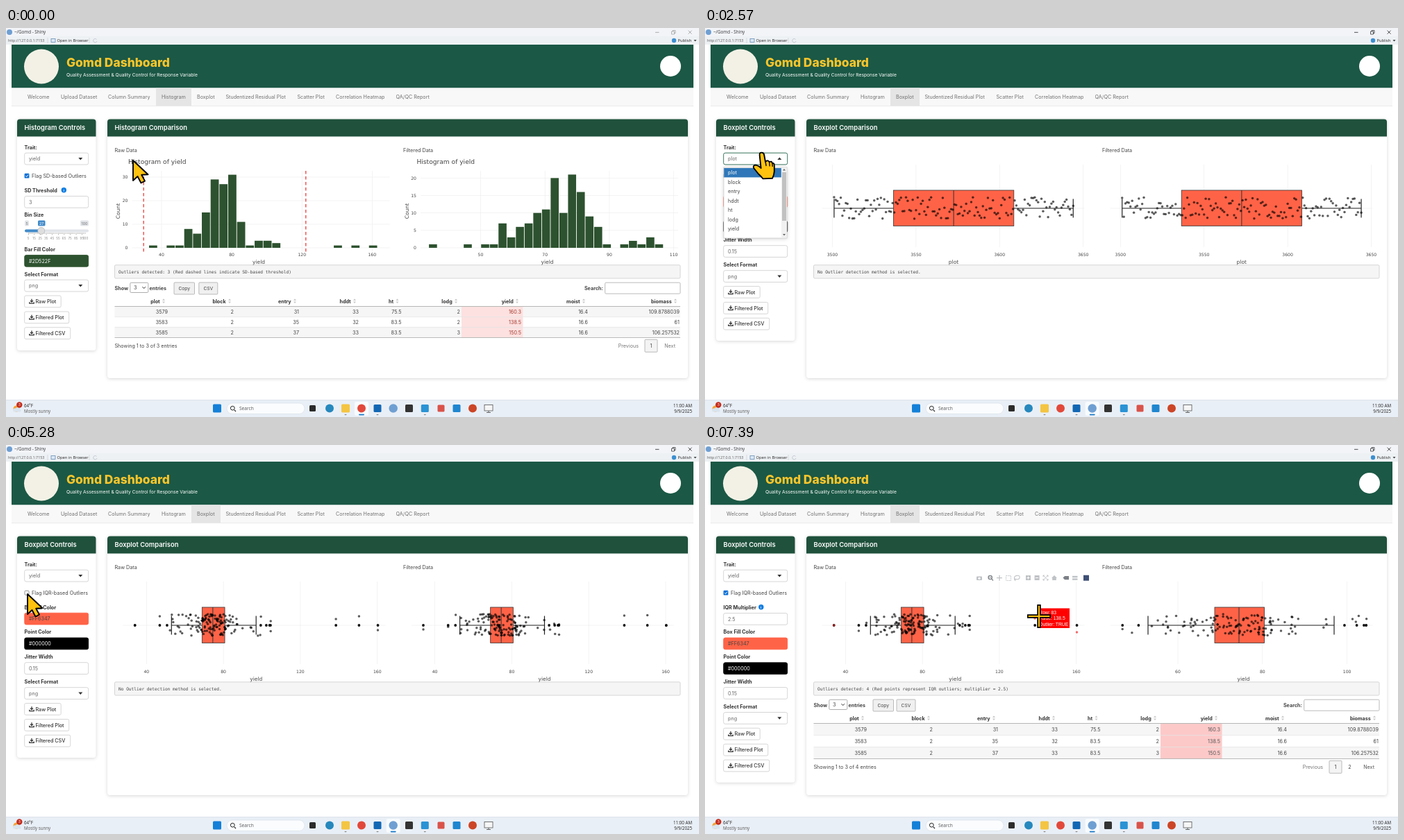
Write an HTML page that moves like this. It is 998 by 561 pixels and loops after 8 s.

```html
<!DOCTYPE html>
<html lang="en">
<head>
<meta charset="utf-8">
<title>Dashboard walkthrough</title>
<style>
html, body { margin: 0; width: 100%; height: 100%; overflow: hidden; background: #fff; }
svg { display: block; width: 998px; height: 561px; font-family: Inter, sans-serif; }
.plot { font-family: "DejaVu Sans", sans-serif; }
.mono { font-family: "DejaVu Sans Mono", monospace; }
.os { font-family: "Open Sans", sans-serif; }
.tip { font-family: "Liberation Sans", sans-serif; }
.panel { filter: drop-shadow(0 1px 2.5px rgba(0, 0, 0, .16)); }
</style>
</head>
<body>
<svg id="stage" viewBox="0 0 998 561" xmlns="http://www.w3.org/2000/svg"></svg>
<script>
const LOOP = 8000;
const END = 'text-anchor="end"', MID = 'text-anchor="middle"', BOLD = 'font-weight="700"';
const GREEN = '#1f513c', BAR = '#2D522F', TOMATO = '#FF6347';

// Markup helpers; text is placed by its vertical middle
const rect = (x, y, w, h, fill, o = '') => `<rect x="${x}" y="${y}" width="${w}" height="${h}" fill="${fill}" ${o}/>`;
const circ = (x, y, r, fill, o = '') => `<circle cx="${x}" cy="${y}" r="${r}" fill="${fill}" ${o}/>`;
const path = (d, stroke, w = 1, o = '') => `<path d="${d}" fill="none" stroke="${stroke}" stroke-width="${w}" ${o}/>`;
const fill = (d, color, o = '') => `<path d="${d}" fill="${color}" ${o}/>`;
const text = (x, y, s, o = '', size = 7.2, color = '#444') =>
  `<text x="${x}" y="${y + size * .36}" font-size="${size}" fill="${color}" ${o}>${s}</text>`;
const frame = (x, y, w, h, o = '', bg = '#fff', line = '#ccc') =>
  rect(x, y, w, h, bg, `stroke="${line}" stroke-width=".8" ${o}`);
const rng = s => () => (s = s * 16807 % 2147483647) / 2147483647;
const each = (list, fn) => list.map(fn).join('');

// Window chrome, banner and taskbar
function base() {
  const tabs = [[31, 'Welcome'], [79, 'Upload Dataset'], [147, 'Column Summary'], [224, 'Histogram'], [275, 'Boxplot'],
    [316.5, 'Studentized Residual Plot'], [419.5, 'Scatter Plot'], [475, 'Correlation Heatmap'], [561.5, 'QA/QC Report']];
  const os = 'class="os"';
  return rect(0, 0, 998, 561, '#fff') + rect(0, 0, 998, 12, '#f2f4f8') + rect(0, 12, 998, 12, '#eef1f4')
    + circ(5, 6, 4, '#6f9fd2') + text(12, 6, '~/Gomd - Shiny', os, 6.3, '#333')
    + text(3, 18, 'http://127.0.0.1:7153', os, 5.4, '#555') + path('M60 14V22M120 14V22', '#ccd2d8', .7)
    + frame(65, 15.5, 6, 5, '', '#dbe8f6', '#6c8fb5') + text(73.5, 18, 'Open in Browser', os, 5.8, '#222')
    + path('M130.5 16.5A2.7 2.7 0 1 0 131 19', '#b9c3cd', .9)
    + circ(962, 18, 3.2, '#3d8fd0') + text(967.5, 18, 'Publish', os, 5.8, '#222') + fill('M990.5 17h4l-2 2.4z', '#444')
    + rect(8, 24, 982, 62.5, '#1b5845') + circ(51, 55.5, 25, '#f3f1e6') + circ(957, 55, 15, '#fff')
    + text(87, 49.5, 'Gomd Dashboard', 'font-weight="800"', 17.4, '#f9c52c')
    + text(87, 68, 'Quality Assessment &amp; Quality Control for Response Variable', '', 6.7, '#fff')
    + rect(8, 86.5, 982, 26, '#f8f8f8') + rect(8, 112, 982, .7, '#e4e4e4')
    + '<g id="tab">' + rect(0, 86.5, 1, 25.5, '#e5e5e5') + '</g>'
    + each(tabs, ([x, s]) => text(x, 99.3, s, '', 7.2, '#707070'))
    + panel(146, 836, 505) + text(156.5, 176, 'Raw Data') + text(572, 176, 'Filtered Data')
    + frame(156.5, 341.8, 814.5, 19.2, 'rx="1.5"', '#f5f5f5') + taskbar();
}

function taskbar() {
  const sq = (x, c, w = 11) => rect(x - w / 2, 548.5 - w / 2, w, w, c, 'rx="1.5"');
  const os = 'class="os"';
  return rect(0, 536, 998, 25, '#e9eff6') + rect(0, 536, 998, .6, '#d5dce4')
    + circ(15, 549, 4.5, '#f2a33a') + fill('M11 553.5a3 3 0 0 1 3-5 4 4 0 0 1 7 2 2 2 0 0 1 0 3z', '#d9e4ee')
    + circ(19.3, 543.5, 4.2, '#c42b1c') + text(19.3, 543.5, '3', MID + os, 5.5, '#fff')
    + text(26, 544.5, '64°F', os, 6.2, '#222') + text(26, 552.5, 'Mostly sunny', os, 6.2, '#555')
    + sq(304, '#1480d8', 12) + rect(318, 541, 112, 15.5, '#fafcfe', 'rx="7.7" stroke="#d6dde5" stroke-width=".6"')
    + path('M328.8 550.8L331 553', '#222', 1.1) + circ(326.3, 548.2, 2.9, 'none', 'stroke="#222" stroke-width="1"')
    + text(336, 548.8, 'Search', os, 6.6, '#555')
    + '<g id="active">' + rect(-10, 539, 20, 20, '#f8fbfd', 'rx="2.5"') + rect(-4, 556.8, 8, 1.6, '#1677c8', 'rx=".8"') + '</g>'
    + sq(441.5, '#2b2b2b', 9) + circ(466, 548.5, 6, '#2688bd') + sq(489, '#f4c542', 12) + circ(512, 548.5, 6, '#e2483a')
    + sq(535, '#1267b4') + circ(557.7, 548.5, 6.2, '#6f9fd2') + sq(580.5, '#333') + sq(603.3, '#2a93d4')
    + sq(626.5, '#d9534a', 10) + sq(649, '#1f86cf', 11) + circ(672, 548.5, 6, '#cc4526')
    + frame(689, 543.5, 12, 8.5, '', '#f5f5f5', '#555') + path('M695 552V554.5M692 554.5H698', '#555', .9)
    + each([489, 535, 603.3], x => rect(x - 1.5, 557, 3, 1.2, '#888', 'rx=".6"'))
    + text(988, 544.8, '11:00 AM', END + os, 6.2, '#222') + text(988, 552.8, '9/9/2025', END + os, 6.2, '#222');
}
const windowButtons = color => path('M935 6.3H940.5M982.6 3.6L987.6 8.6M987.6 3.6L982.6 8.6', color, .8)
  + path('M958.5 5H962.5V9H958.5ZM960 5V3.5H964V7.5H962.5', color, .7);

function panel(x, w, bottom) {
  return rect(x, 131.5, w, bottom - 131.5, '#fff', 'rx="4" class="panel"')
    + fill(`M${x} 156.5V135.5q0-4 4-4H${x + w - 4}q4 0 4 4V156.5Z`, GREEN);
}
const heading = (x, s) => text(x, 144, s, 'font-weight="600"', 9.4, '#fff');

// Form controls
const label = (y, s) => text(26.5, y, s, BOLD, 7.2, '#333');
const info = (x, y) => circ(x, y, 3.7, '#0d7be0') + text(x, y, 'i', MID + BOLD, 5, '#fff');
const input = (y, s, bg = '#fff', color = '#666') =>
  frame(26.7, y - 8.3, 92, 16.8, 'rx="2.5"', bg, bg === '#fff' ? '#ccc' : bg) + text(33, y + .3, s, '', 7.2, color);
const select = (y, s) => input(y, s) + fill(`M104.3 ${y - 1.5}h6l-3 3.4z`, '#333');
const download = (x, y) => path(`M${x} ${y - 3.6}V${y + .4}M${x - 2} ${y - 1.2}L${x} ${y + .8}L${x + 2} ${y - 1.2}`, '#333', 1.3)
  + path(`M${x - 3.2} ${y + 1}V${y + 2.8}H${x + 3.2}V${y + 1}`, '#333', 1.3);
const button = (y, s, w) => frame(26.7, y - 8.3, w, 16.8, 'rx="2"') + download(37, y) + text(42.5, y + .2, s, 'font-weight="500"', 7.2, '#333');
const buttons = y => button(y, 'Raw Plot', 52.5) + button(y + 23, 'Filtered Plot', 64) + button(y + 45.8, 'Filtered CSV', 66);
const tick = on => on ? rect(26.6, 209.8, 6.8, 6.8, '#0b6fd6', 'rx="1.2"') + path('M28.2 213.2L29.6 214.7L32 211.6', '#fff', 1)
  : frame(27, 210.2, 6, 6, 'rx="1.2"', '#fff', '#777');

function slider() {
  const tag = (x, w, s, bg, c) => rect(x, 277.5, w, 8, bg, 'rx="1.5"') + text(x + w / 2, 281.7, s, MID, 5.4, c);
  let s = tag(27, 6, '5', '#e1e4e9', '#777') + tag(107, 12, '100', '#e1e4e9', '#777') + tag(46, 10.5, '27', '#428bca', '#fff')
    + rect(27, 290.5, 92, 4, '#e1e4e9', 'rx="2"') + rect(27, 290.5, 23, 4, '#428bca', 'rx="2"');
  for (let i = 0; i <= 38; i++) s += rect(32 + i * 2.15, 295, .5, i % 4 ? 2 : 3.5, '#777');
  for (let i = 0; i < 10; i++) s += text(32 + i * 8.6, 303.5, 5 + i * 10, MID, 4.6, '#888');
  return s + text(114.5, 303.5, '100', MID, 4.6, '#888') + circ(50.7, 292.5, 5, '#dedede', 'stroke="#aaa" stroke-width=".6"');
}
const histControls = () => panel(16, 113.5, 465) + heading(26.5, 'Histogram Controls') + label(172, 'Trait:') + select(188.5, 'yield')
  + tick(true) + text(37, 213, 'Flag SD-based Outliers') + label(234, 'SD Threshold') + info(83.3, 233.8) + input(250.8, '3')
  + label(269.8, 'Bin Size') + slider() + label(319, 'Bar Fill Color') + input(335.8, BAR, BAR, '#fff')
  + label(355, 'Select Format') + select(371.5, 'png') + buttons(394.3);
function boxControls(d) {
  return panel(16, 113.5, 451 + d) + heading(26.5, 'Boxplot Controls') + label(172, 'Trait:') + select(188.5, '')
    + text(37, 213, 'Flag IQR-based Outliers')
    + (d ? label(234, 'IQR Multiplier') + info(80.8, 233.8) + input(250.8, '2.5') : '')
    + label(234 + d, 'Box Fill Color') + input(250.5 + d, '#FF6347', TOMATO, '#444')
    + label(269.8 + d, 'Point Color') + input(286.3 + d, '#000000', '#000', '#fff')
    + label(305.6 + d, 'Jitter Width') + input(322 + d, '0.15')
    + label(341.5 + d, 'Select Format') + select(358 + d, 'png') + buttons(380.8 + d);
}
function menu() {
  const items = ['plot', 'block', 'entry', 'hddt', 'ht', 'lodg', 'yield'];
  return frame(27, 201, 91, 102, 'class="panel"') + rect(27.3, 202, 82.5, 13.4, '#2f77b8') + rect(110, 201.4, 7.6, 101, '#f1f1f1')
    + rect(111, 208, 6, 70, '#c1c1c1') + fill('M112 205.5h4l-2-2.5zM112 297h4l-2 2.5z', '#666')
    + each(items, (s, i) => text(33, 208.7 + i * 13.5, s, '', 7.2, i ? '#444' : '#fff'));
}

// Plots
const axisText = (x, y, s, o = MID, size = 6.1) => text(x, y, s, o + ' class="plot"', size, '#444');
const bins = [1, 0, 1, 1, 8, 6, 15, 29, 27, 31, 11, 1, 3, 3, 2, 0, 0, 0, 0, 0, 0, 1, 0, 1, 0, 1];
const kept = [1, 0, 0, 0, 1, 0, 1, 1, 7, 3, 6, 7, 10, 11, 20, 10, 21, 16, 9, 6, 1, 0, 1, 2, 1, 3, 1];

function histogram(x, counts, x0, w, unit, step, xt, dx, tx) {
  let s = axisText(x + 19.5, 192.3, 'Histogram of yield', '', 9.1);
  for (let v = 0; 317 - v * unit > 206; v += step) {
    const y = 317 - v * unit;
    s += rect(x + 25, y - .3, 371, .6, '#ececec') + axisText(x + 19, y, v, END);
  }
  xt.forEach((v, i) => s += rect(tx + i * dx - .3, 206, .6, 117, '#ececec') + axisText(tx + i * dx, 327, v));
  counts.forEach((n, i) => { if (n) s += rect((x0 + i * w + .4).toFixed(2), 317 - n * unit, w - .9, n * unit, BAR); });
  return s + axisText(x + 207.5, 337, 'yield', MID, 7.5)
    + axisText(0, 0, 'Count', MID + ` transform="translate(${x + 5} 264) rotate(-90)"`, 7.5);
}

const dot = (x, y, c = 'rgba(0,0,0,.64)') => circ(x.toFixed(1), y.toFixed(1), 1.75, c);
function boxplot(x, title, tx, ticks, box, outs, dots) {
  const [lo, q1, med, q3, hi] = box;
  return rect(x + 12, 259.7, 378, .6, '#ececec')
    + each(ticks, ([px, s]) => rect(px - .3, 197, .6, 119, '#ececec') + axisText(px, 326.7, s))
    + path(`M${lo} 260H${q1}M${q3} 260H${hi}M${lo} 246.5V273.5M${hi} 246.5V273.5`, '#222', 1.2)
    + frame(q1, 234, q3 - q1, 51.5, '', TOMATO, '#333') + path(`M${med} 234V285.5`, '#333', 1)
    + each(outs, px => circ(px, 260, 1.9, '#111')) + dots + axisText(tx, 337, title, MID, 7.5);
}
function plotTrait(x, seed) {
  const r = rng(seed), at = v => x + 27 + v * 2.408;
  let dots = '';
  for (let i = 1; i <= 144; i++) dots += dot(at(i), 244 + r() * 31);
  return boxplot(x, 'plot', x + 201.5, [0, 50, 100, 150].map(v => [at(v), 3500 + v]), [at(1), at(36.5), at(72.5), at(108.5), at(144)], [], dots);
}

const far = [34, 138.5, 150.5, 160.3];
const edge = [46.9, 50.7, 99.4, 102.3, 104, 104.5];
function yieldTrait(x, seed, zoom, farY, farColor) {
  const r = rng(seed), at = zoom ? v => 681 + (v - 60) * 6.09 : v => x + 45.8 + (v - 40) * 2.77;
  let dots = '';
  bins.slice(0, 15).forEach((n, i) => {
    for (let k = 0; i && k < n; k++) {
      const v = Math.min(104.6, Math.max(46.9, 32.9 + 5 * (i + r())));
      dots += dot(at(v), 244 + r() * 31);
    }
  });
  const outs = zoom ? edge : edge.concat(far);
  if (!zoom) far.forEach((v, i) => dots += dot(at(v), farY[i], farColor));
  const ticks = zoom ? [60, 80, 100] : [40, 80, 120, 160];
  return boxplot(x, 'yield', x + 203.8, ticks.map(v => [at(v), v]),
    zoom ? [638, 734, 769, 805.5, 906] : [53, 68.9, 74.5, 80.7, 97].map(at), outs.map(at), dots);
}
const message = (s, o = '') => text(162, 351.3, s, 'class="mono" ' + o, 6.18, '#444');

function table(rowH, total, pink, ink, csvX, pages) {
  const cols = [['plot', 233], ['block', 328], ['entry', 422], ['hddt', 508], ['ht', 569.5], ['lodg', 654], ['yield', 742], ['moist', 838], ['biomass', 970]];
  const rows = ['3579 2 31 33 75.5 2 160.3 16.4 109.8788039', '3583 2 35 32 83.5 2 138.5 16.6 61', '3585 2 37 33 83.5 3 150.5 16.6 106.257532'];
  const top = 401.5, bottom = top + rowH * 3, py = bottom + 11.5;
  const tool = (x, w, s) => frame(x, 367, w, 17, 'rx="1"', '#f0f0f0', '#aaa') + text(x + w / 2, 375.8, s, MID, 6.7);
  let s = text(156.5, 375, 'Show', BOLD) + frame(178.8, 367.3, 26, 14.2, 'rx="1.5"', '#fff', '#999') + text(184, 374.6, '3')
    + path('M196.5 373.2L198.7 375.6L200.9 373.2', '#333', 1) + text(206.5, 375, 'entries', BOLD)
    + tool(242, 29.5, 'Copy') + tool(csvX, 27, 'CSV')
    + text(860, 375.3, 'Search:', BOLD + END) + frame(862.7, 367.2, 108.3, 16, 'rx="1.5"', '#fff', '#aaa');
  cols.forEach(([name, x]) => s += text(x - 11.3, 394, name, BOLD + END, 7.2, '#333')
    + fill(`M${x - 8} 393h4l-2-2.8zM${x - 8} 394.5h4l-2 2.8z`, '#ccc'));
  rows.forEach((row, i) => {
    const y = top + i * rowH;
    s += rect(156.5, y, 814.5, rowH, i % 2 ? '#fff' : '#f6f6f6') + rect(656, y, 88.5, rowH, pink) + rect(156.5, y, 814.5, .6, '#ddd');
    row.split(' ').forEach((v, c) => s += text(cols[c][1], y + rowH / 2, v, END, 7.2, c === 6 ? ink : '#444'));
  });
  const x1 = pages > 1 ? 908 : 929;
  s += rect(156.5, top - .4, 814.5, .8, '#aaa') + rect(156.5, bottom - .4, 814.5, .8, '#aaa')
    + text(156.5, py, `Showing 1 to 3 of ${total} entries`) + text(x1 - 18, py + .4, 'Previous', END, 7.2, '#777')
    + frame(x1 - 9, py - 8.7, 18, 18, 'rx="1"', '#f4f4f4', '#aaa') + text(x1, py + .4, '1', MID) + text(964, py + .4, 'Next', END, 7.2, pages > 1 ? '#555' : '#777');
  return s + (pages > 1 ? text(928.5, py + .4, '2', MID) : '');
}

function modebar() {
  const g = '#bfc2c6', d = '#7d8187';
  return rect(391, 189.5, 8, 5.5, g, 'rx="1"') + circ(395, 192.3, 1.6, '#fff')
    + circ(410.7, 191, 2.6, 'none', `stroke="${d}" stroke-width="1.4"`) + path('M412.6 193L415 195.5M409.5 191H412', d, 1.2)
    + path('M420 191.7H428M424 187.7V195.7', g, 1.3) + path('M433.5 188.5H440.5V195.5H433.5Z', g, 1, 'stroke-dasharray="1.5 1"')
    + path('M446 194.8Q444 189 449 188.4T453 191.5T446 193L447 196', g, 1.1)
    + rect(462, 188, 7, 7, g) + path('M463.5 191.5H467.5M465.5 189.5V193.5', '#fff', 1)
    + rect(474.6, 188, 7, 7, g) + path('M476 191.5H480', '#fff', 1)
    + path('M487 188L494 195M494 188L487 195M487 190V188H489M492 188H494V190M494 193V195H492M489 195H487V193', g, .9)
    + fill('M499 191.8l4-3.8 4 3.8h-1.2v3.2h-5.6v-3.2z', g) + fill('M515.5 191.6l2.5-2.6h6v5.2h-6z', d)
    + rect(529, 188.8, 7.5, 2.4, g) + rect(529, 192.4, 7.5, 2.4, g) + rect(545, 187.7, 8, 8, '#3f4f75');
}
const tooltip = () => rect(481.5, 235.5, 43.5, 28.5, '#f00')
  + each(['Row: 83', 'Value: 138.5', 'Outlier: TRUE'], (s, i) => text(481.3, 241.2 + i * 8.7, s, 'class="tip"', 6.76, '#fff'));

// Pointer shapes, hotspot at 0,0
const GOLD = '#FFC20E', outline = 'stroke="#000" stroke-width="1.9" stroke-linejoin="round"';
const bar2 = d => path(d, '#000', 5.2) + path(d, GOLD, 2);
const pointers = {
  arrow: fill('M0 0V29L6.5 23L11.5 32.5L17 29.6L12.2 20.8L21.5 20.2Z', GOLD, outline),
  hand: fill('M-3.4 4Q-3.6 .6-.4 .6Q2.6 .6 3.2 4L5 14Q9 10.5 10.6 14.3Q14 12.3 14.9 16Q18 15.2 17.8 20V28Q17.4 33 15 37.8L1.5 38.4Q-1 35-5 31.5L-11.8 23Q-13.2 19.4-9.8 18.6Q-6 18.6-1.4 23Z', GOLD, outline)
    + path('M5 14L6.2 20M10.6 14.3L11.2 20.5M14.9 16L15.2 21', '#000', 1.4),
  beam: bar2('M-5-15H5M-5 15H5M0-15V15'),
  cross: path('M-17 0H17M0-17V17', '#000', 5.4) + path('M-15.3 0H15.3M0-15.3V15.3', GOLD, 2)
};
const shapes = [[0, 'arrow'], [540, 'hand'], [3430, 'beam'], [4570, 'arrow'], [4800, 'hand'], [5040, 'arrow'], [6510, 'hand'], [6580, 'arrow'], [6660, 'cross']];

// Pointer moves: start, end, number of steps, way points
const moves = [
  [210, 870, 9, [[183, 191], [215, 170], [262, 130], [318, 100], [328, 97], [306, 99], [294, 101]]],
  [2080, 2080, 1, [[294, 101], [291, 103]]],
  [2150, 2570, 6, [[291, 103], [240, 122], [130, 165], [90, 178], [82, 179]]],
  [2810, 3290, 7, [[82, 179], [78, 190], [60, 235], [45, 280], [41, 290]]],
  [4490, 5280, 11, [[41, 290], [48, 265], [66, 215], [72, 190], [60, 184], [40, 198], [32, 212], [31, 215]]],
  [6510, 6510, 1, [[31, 215], [77, 214]]],
  [6580, 7290, 10, [[77, 214], [125, 245], [200, 288], [290, 312], [380, 302], [440, 270], [474, 249], [482, 247]]],
  [7390, 7390, 1, [[482, 247], [481, 247]]]
];
function pointerAt(t) {
  const [t0, t1, n, pts] = moves.filter(m => m[0] <= t).pop() || [0, 0, 1, [[183, 191], [183, 191]]];
  const k = t1 > t0 ? Math.min(n, 1 + Math.floor((t - t0) / (t1 - t0) * (n - 1) + 1e-6)) : n;
  const u = k / n * (pts.length - 1), i = Math.min(pts.length - 2, Math.floor(u)), f = u - i;
  return [0, 1].map(a => pts[i][a] + (pts[i + 1][a] - pts[i][a]) * f);
}

const NONE = 'No Outlier detection method is selected.';
const DIM = 'opacity=".3"';
const trait = s => text(33, 188.8, s, '', 7.2, '#666');
const layers = [
  [0, 1340, windowButtons('#999')],
  [1340, LOOP, windowButtons('#222')],
  [0, 1440, histControls() + heading(156.5, 'Histogram Comparison')
    + histogram(156.5, bins, 205.6, 12.67, 3.4, 10, [40, 80, 120, 160], 101.1, 224)
    + path('M198.2 206V323M431.8 206V323', '#e8403c', 1.3, 'stroke-dasharray="4.6 3.4"')
    + histogram(572, kept, 608.7, 12.52, 5.03, 5, [50, 70, 90, 110], 92.7, 683.5)
    + message('Outliers detected: 3 (Red dashed lines indicate SD-based threshold)')
    + table(15, 3, '#fce1e0', '#a5392f', 277.8, 1)],
  [1440, LOOP, heading(156.5, 'Boxplot Comparison')],
  [1440, 5440, boxControls(0)],
  [5440, LOOP, boxControls(35.8)],
  [1440, 5360, tick(false)],
  [5360, LOOP, tick(true)],
  [1440, 3430, trait('plot')],
  [3430, LOOP, trait('yield')],
  [1440, 3660, plotTrait(156.5, 77) + plotTrait(571.3, 4021)],
  [3660, 5620, yieldTrait(156.5, 913, false, [260, 251, 247, 267]) + yieldTrait(571.8, 5501, false, [266, 246, 245.5, 260.5])],
  [5620, LOOP, yieldTrait(156.5, 2203, false, [260, 250, 260, 270], 'rgba(235,30,30,.66)') + yieldTrait(571.8, 8117, true)],
  [1440, 3500, message(NONE)],
  [3500, 3660, message(NONE, DIM)],
  [3660, 5440, message(NONE)],
  [5440, 5620, message(NONE, DIM)],
  [5620, LOOP, message('Outliers detected: 4 (Red points represent IQR outliers; multiplier = 2.5)')],
  [5680, LOOP, table(17, 4, '#fcc9c8', '#555', 276, 2)],
  [2570, 5280, frame(26.7, 180.2, 92, 16.8, 'rx="2.5"', 'none', '#1f6a4c')],
  [2570, 3430, rect(103, 185, 9, 7, '#fff') + fill('M104.3 190h6l-3-3.4z', '#333') + menu()],
  [3290, 3430, rect(27.4, 283, 82.4, 13.4, '#f2f2f2') + text(33, 289.7, 'yield')],
  [6660, LOOP, modebar()],
  [7290, LOOP, tooltip()]
];

const stage = document.getElementById('stage');
stage.innerHTML = base() + each(layers, l => `<g class="layer">${l[2]}</g>`)
  + '<g id="pointer">' + each(Object.keys(pointers), k => `<g data-shape="${k}">${pointers[k]}</g>`) + '</g>';
const groups = stage.querySelectorAll('.layer');
const pointer = stage.querySelector('#pointer');
const tab = stage.querySelector('#tab'), active = stage.querySelector('#active');
const show = (el, on) => el.setAttribute('display', on ? 'inline' : 'none');

function draw(t) {
  layers.forEach(([a, b], i) => show(groups[i], t >= a && t < b));
  tab.setAttribute('transform', t < 1440 ? 'translate(216 0) scale(51 1)' : 'translate(267 0) scale(42 1)');
  active.setAttribute('transform', `translate(${t < 1340 ? 512 : 557.7} 0)`);
  const shape = shapes.filter(s => s[0] <= t).pop()[1];
  for (const g of pointer.children) show(g, g.dataset.shape === shape);
  pointer.setAttribute('transform', `translate(${pointerAt(t)})`);
}
const start = performance.now();
function loop() {
  draw((performance.now() - start) % LOOP);
  requestAnimationFrame(loop);
}
loop();
</script>
</body>
</html>
```
